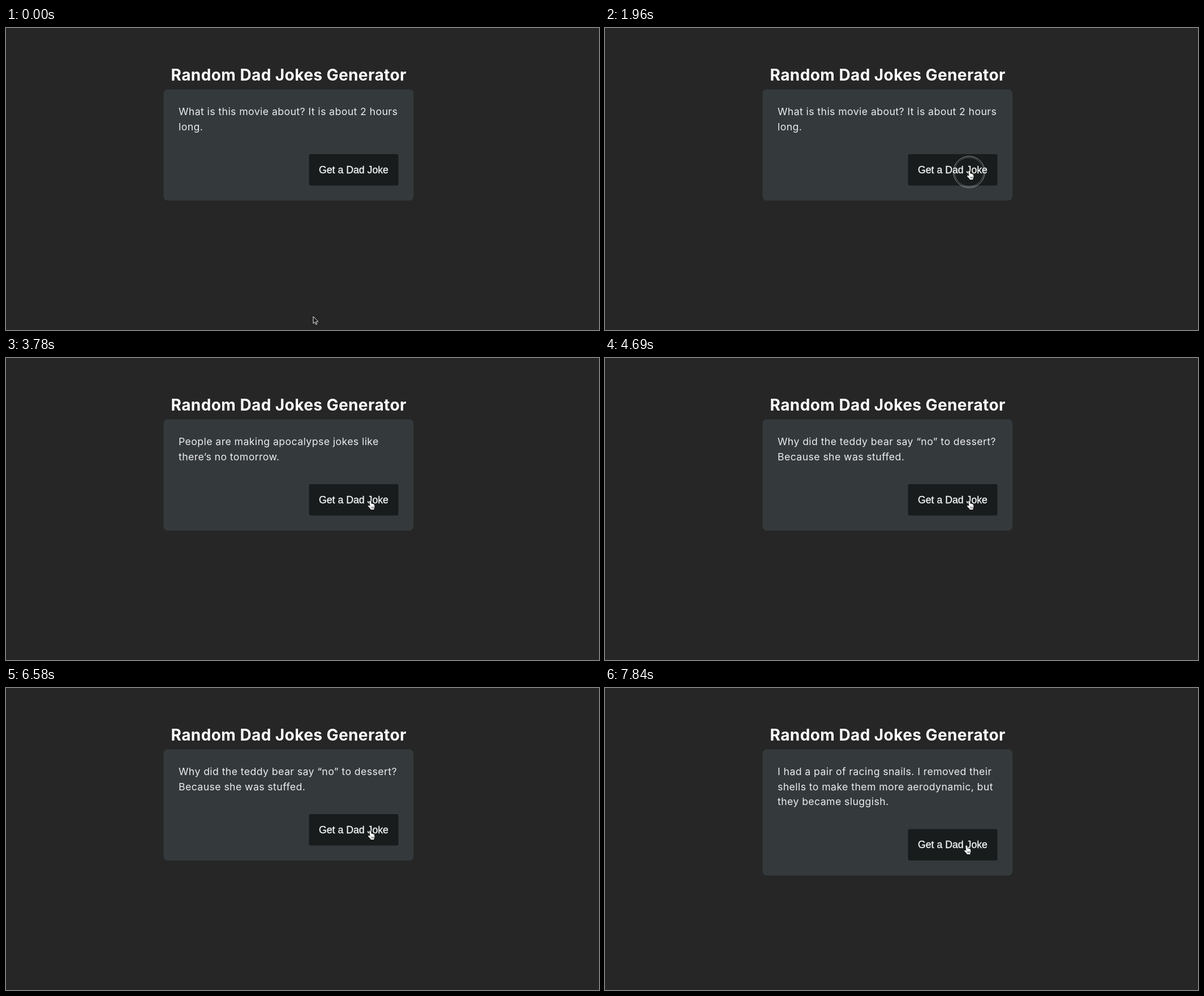
Write an HTML page that moves like this. It is 1048x534 px and loops after 8000 ms.

```html
<!DOCTYPE html>
<html lang="en">
<head>
<meta charset="utf-8">
<title>Random Dad Jokes Generator</title>
<style>
  html, body { margin: 0; width: 100%; height: 100%; overflow: hidden; background: #262626; }
  svg { display: block; width: 100vw; height: 100vh; }
  text { white-space: pre; }
  .title { font: 700 28px Inter, sans-serif; letter-spacing: .42px; fill: #fff; }
  .joke { font: 400 17.7px Inter, sans-serif; letter-spacing: .4px; fill: #eceded; }
  .label { font: 17.7px "Liberation Sans", Arial, sans-serif; fill: #f8f9f9; stroke: #f8f9f9; stroke-width: .3px; }
</style>
</head>
<body>
<svg viewBox="0 0 1048 534">
  <rect width="1048" height="534" fill="#262626"/>
  <text class="title" x="291.5" y="93">Random Dad Jokes Generator</text>
  <rect id="card" x="278.5" y="108.5" width="441.5" height="196.5" rx="7" fill="#34393c"/>
  <text class="joke" x="305" y="154"></text>
  <text class="joke" x="305" y="180.6"></text>
  <text class="joke" x="305" y="207.2"></text>
  <g id="button">
    <rect x="535.5" y="223" width="158" height="55.5" rx="3" fill="#181c1c"/>
    <text class="label" x="553" y="256.7">Get a Dad Joke</text>
  </g>
  <g id="ring" fill="none" stroke="#d5d7d7" stroke-opacity=".7">
    <circle cx="643.5" cy="254.5" r="27.8" stroke-width=".9"/>
    <circle cx="643.5" cy="254.5" r="25.6" stroke-width=".7" stroke-opacity=".5"/>
  </g>
  <path id="arrow" d="M0 0V12.5L2.8 9.9L4.8 14.4L6.7 13.6L4.8 9.3L8.7 9.1Z"
        fill="#17191a" stroke="#eee" stroke-width="1" stroke-linejoin="round"/>
  <g id="hand" stroke="#181c1c" stroke-linejoin="round" stroke-linecap="round">
    <path d="M-1.3 1Q-1.4-.4 0-.4Q1-.3 1.3 1L2.2 5Q3.2 4.4 4 5.2Q5.1 4.7 5.8 5.8Q7.2 5.4 7.5 7L7.8 10Q7.9 11.8 6.9 13.2L6.7 15.2H1.2L.9 14L-3 10Q-3.9 8.4-2.6 7.9Q-1.5 7.8.1 9.2Z"
          fill="#fff" stroke-width="1.5" paint-order="stroke"/>
    <path d="M2.2 10.5L2.6 13M4.1 10.4L4.3 13M5.8 10.2V12.8" fill="none" stroke-width=".7"/>
  </g>
</svg>
<script>
const LOOP = 8000, TICK = 70;
const LINE = 26.6;
const $ = id => document.getElementById(id);
const lines = document.querySelectorAll('.joke');

const jokes = [
  { at: 0, text: ['What is this movie about? It is about 2 hours', 'long.'] },
  { at: 2800, text: ['People are making apocalypse jokes like', 'there’s no tomorrow.'] },
  { at: 4690, text: ['Why did the teddy bear say “no” to dessert?', 'Because she was stuffed.'] },
  { at: 6860, text: ['I had a pair of racing snails. I removed their',
                     'shells to make them more aerodynamic, but',
                     'they became sluggish.'] }
];
const clicks = [[1890, 2100], [4200, 4410], [6370, 6510]];
const HOVER = 1190;

// Pointer path: time, x, y
const path = [
  [70, 543, 510], [140, 547, 497], [210, 568, 440], [280, 602, 362],
  [350, 637, 298], [420, 656, 264], [490, 652, 250], [560, 644.5, 246],
  [1120, 644.5, 246], [1190, 652, 250], [1330, 644.5, 251],
  [1400, 644.5, 251], [1680, 643.5, 252.8],
  [7420, 643.5, 252.8], [7630, 643.5, 265], [7840, 638.5, 278.8]
];

function pointerAt(t) {
  const i = path.findIndex(p => p[0] > t);
  if (i === 0) return path[0].slice(1);
  if (i < 0) return path[path.length - 1].slice(1);
  const [t0, x0, y0] = path[i - 1], [t1, x1, y1] = path[i];
  const k = (t - t0) / (t1 - t0);
  return [x0 + (x1 - x0) * k, y0 + (y1 - y0) * k];
}

const show = (el, on) => el.setAttribute('visibility', on ? 'visible' : 'hidden');
const move = (el, x, y) => el.setAttribute('transform', `translate(${x} ${y})`);
let shown = null;

function showJoke(joke) {
  if (joke === shown) return;
  shown = joke;
  lines.forEach((el, i) => { el.textContent = joke.text[i] || ''; });
  const extra = (joke.text.length - 2) * LINE;
  $('card').setAttribute('height', 196.5 + extra);
  move($('button'), 0, extra);
}

function draw(time) {
  const t = Math.floor(time % LOOP / TICK) * TICK;
  showJoke(jokes.filter(j => j.at <= t).pop());

  const [x, y] = pointerAt(t), hover = t >= HOVER;
  move($('arrow'), x, y);
  move($('hand'), x, y);
  show($('arrow'), !hover);
  show($('hand'), hover);
  show($('ring'), clicks.some(([from, to]) => t >= from && t < to));
}

const start = performance.now();
function frame() {
  draw(performance.now() - start);
  requestAnimationFrame(frame);
}
frame();
</script>
</body>
</html>
```
